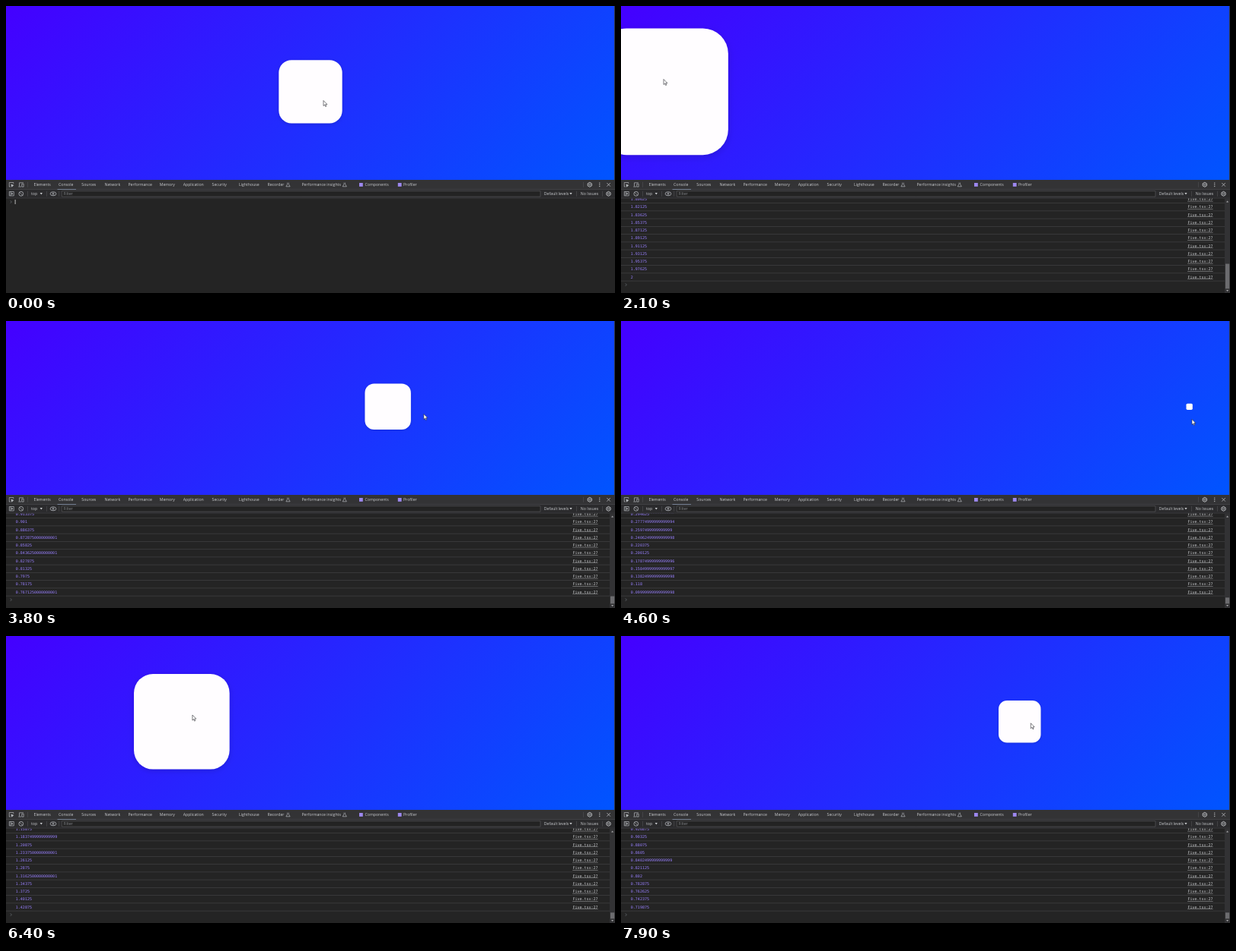
These frames come from a looping animation (800 px wide and 378 px high, 8000 ms). An HTML page with a canvas:

```html
<!DOCTYPE html>
<html lang="en">
<head>
<meta charset="utf-8">
<title>Drag to scale</title>
<style>
  html, body { margin: 0; width: 100%; height: 100%; overflow: hidden; background: #242424; }
  canvas { display: block; width: 800px; height: 378px; }
</style>
</head>
<body>
<canvas id="stage" width="800" height="378"></canvas>
<script>
const ctx = document.getElementById('stage').getContext('2d');
const LOOP = 8000, STEP = 100;
const UNIT = 800 / 1920;          // page pixels to stage pixels
const UI = '"Open Sans", "Noto Sans", sans-serif';
const MONO = '"DejaVu Sans Mono", monospace';

// ---------- motion ----------
// Each drag runs through a few [time, offset] points from press to release;
// gap is the time between its log entries.
const drags = [
  { gap: 44, path: [[434, 0], [1200, -560], [1622, -645], [2062, -800], [2100, -822], [2150, -819]] },
  { gap: 18, path: [[3356, 0], [3900, 312], [4382, 627], [4562, 800], [4602, 832]] },
  { gap: 18, path: [[5954, 0], [6600, -600], [6872, -721], [7052, -775], [7100, -770],
    [7500, -216], [7682, 65], [7862, 249], [7900, 297], [8000, 420]] }
];
drags.forEach((d, i) => {
  d.press = d.path[0][0];
  [d.release, d.end] = d.path[d.path.length - 1];
  d.until = i + 1 < drags.length ? drags[i + 1].path[0][0] : LOOP;
});

// time, x, y of the pointer's tip
const pointerPath = [
  [100, 417, 124.5], [200, 379.5, 117.5], [434, 379.5, 117.5], [1200, 147, 102],
  [2100, 56, 96.5], [3000, 316.7, 113], [3356, 400, 117], [4600, 750, 129.5],
  [5600, 513.7, 117], [5954, 402, 112], [7100, 81.7, 95.5], [7900, 538.3, 114.8], [8000, 580, 117]
];

// Monotone cubic through the points, for column c
function follow(path, t, c = 1) {
  const last = path.length - 1;
  if (t <= path[0][0]) return path[0][c];
  if (t >= path[last][0]) return path[last][c];
  let i = 0;
  while (path[i + 1][0] < t) i++;
  const slope = k => k < 0 || k >= last ? 0
    : (path[k + 1][c] - path[k][c]) / (path[k + 1][0] - path[k][0]);
  const tangent = k => {
    const a = slope(k - 1), b = slope(k);
    return a * b > 0 ? 2 * a * b / (a + b) : 0;
  };
  const h = path[i + 1][0] - path[i][0], p = (t - path[i][0]) / h, q = 1 - p;
  return q * q * (1 + 2 * p) * path[i][c] + p * p * (1 + 2 * q) * path[i + 1][c]
    + h * p * q * (q * tangent(i) - p * tangent(i + 1));
}

// Overdamped spring: stiffness 200, damping 40, mass 1
function spring(from, ms) {
  const d = Math.sqrt(200), slow = 20 - d, fast = 20 + d, s = ms / 1000;
  return from * (fast * Math.exp(-slow * s) - slow * Math.exp(-fast * s)) / (2 * d);
}

function dragX(t) {
  const d = drags.find(d => t >= d.press && t < d.until);
  if (!d) return 0;
  return t < d.release ? Math.round(follow(d.path, t)) : spring(d.end, t - d.release);
}

const mix = (a, b, p) => a + (b - a) * p;
function scaleOf(x) {
  const u = Math.max(-800, Math.min(800, x));
  return u < 0 ? mix(2, 1, (u + 800) / 800) : mix(1, 0.1, u / 800);
}

// ---------- console log ----------
const LOG_DELAY = 36, SPRING_GAP = 18;
const logs = [];
let lastText = '1';
for (const d of drags) {
  for (let t = d.press; t < d.until; t += t < d.release ? d.gap : SPRING_GAP) {
    const text = String(scaleOf(dragX(t)));
    if (text !== lastText) logs.push({ t, text });
    lastText = text;
  }
}

// ---------- drawing helpers ----------
const GREY = '#b4b7bb', LIGHT = '#c9cbce';

function rect(x, y, w, h, fill) {
  ctx.fillStyle = fill;
  ctx.fillRect(x, y, w, h);
}
function text(str, x, y, { color = LIGHT, size = 5.2, font = UI, align = 'left' } = {}) {
  ctx.font = `${size}px ${font}`;
  ctx.textAlign = align;
  ctx.fillStyle = color;
  ctx.fillText(str, x, y + size * 0.36);
}
function outline(color, width) {
  ctx.strokeStyle = color;
  ctx.lineWidth = width;
  ctx.stroke();
}
function trace(points) {
  ctx.beginPath();
  points.forEach(([x, y]) => ctx.lineTo(x, y));
}
function line(points, color = GREY, width = 0.7) {
  trace(points);
  outline(color, width);
}
function fillPoly(points, color = GREY) {
  trace(points);
  ctx.fillStyle = color;
  ctx.fill();
}
function oval(x, y, rx, ry = rx) {
  ctx.beginPath();
  ctx.ellipse(x, y, rx, ry, 0, 0, 2 * Math.PI);
  outline(GREY, 0.8);
}
function frame(x, y, w, h, color = GREY) {
  ctx.beginPath();
  ctx.rect(x, y, w, h);
  outline(color, 0.7);
}
const triangle = (x, y, w, h, color) =>
  fillPoly([[x - w, y - h], [x + w, y - h], [x, y + h]], color);
const divider = (x, y) => rect(x, y - 3.5, 0.6, 7, '#505054');

function gear(x, y) {
  const corner = i => {
    const a = Math.PI / 6 + i * Math.PI / 3;
    return [x + 3 * Math.cos(a), y + 3 * Math.sin(a)];
  };
  line([0, 1, 2, 3, 4, 5, 6].map(corner), LIGHT, 0.9);
  oval(x, y, 1.1);
}
function flask(x, y) {
  line([[x - 0.8, y - 2.6], [x - 0.8, y - 0.6], [x - 2.6, y + 2.5], [x + 2.6, y + 2.5],
    [x + 0.8, y - 0.6], [x + 0.8, y - 2.6]]);
}

// ---------- scene ----------
const PAGE_H = 229, CENTER_Y = 112.8;

function drawPage(x) {
  const half = (800 + PAGE_H) / 4;
  const g = ctx.createLinearGradient(400 - half, PAGE_H / 2 - half, 400 + half, PAGE_H / 2 + half);
  g.addColorStop(0, '#4400ff');
  g.addColorStop(1, '#0055ff');
  rect(0, 0, 800, PAGE_H, g);
  rect(799, 0, 1, PAGE_H, '#33343c');

  const s = scaleOf(x), size = 200 * UNIT * s;
  ctx.save();
  ctx.shadowColor = 'rgba(0,0,0,0.14)';
  ctx.shadowBlur = 5 * s;
  ctx.shadowOffsetY = 1.2 * s;
  ctx.beginPath();
  ctx.roundRect(400 + x * UNIT - size / 2, CENTER_Y - size / 2, size, size, size / 5);
  ctx.fillStyle = '#fffdff';
  ctx.fill();
  ctx.restore();
}

const tabs = {
  Elements: 36.5, Console: 69, Sources: 99.3, Network: 129.5, Performance: 160.5,
  Memory: 201.7, Application: 232.7, Security: 270.6, Lighthouse: 306, Recorder: 343.5,
  'Performance insights': 388.5, Components: 471.5, Profiler: 522
};

function drawTabs() {
  const y = 235.3;
  rect(0, PAGE_H, 800, 13, '#333335');
  rect(0, 241.2, 800, 0.7, '#4b4b4f');
  rect(67.5, 241, 24.5, 0.8, '#93a3bd');

  line([[9.8, 234], [9.8, 232.5], [4.3, 232.5], [4.3, 238], [6, 238]]);
  fillPoly([[6.5, 234.6], [10.4, 236], [7.3, 238.7]]);
  line([[17.5, 237.5], [17.5, 232.8], [23, 232.8]]);
  line([[16.3, 238], [20, 238]]);
  frame(20.8, 234.3, 2.4, 3.8);
  divider(28, y);

  for (const name in tabs) text(name, tabs[name], y);
  for (const x of [370.5, 444.8]) flask(x, y);
  for (const x of [464, 514.8]) rect(x, 233, 4.8, 4.8, '#9d88f0');

  divider(758, y);
  gear(766.8, y);
  for (const dy of [-2.2, 0, 2.2]) rect(779.2, y + dy - 0.5, 1.1, 1.1, LIGHT);
  for (const s of [-2.3, 2.3]) line([[791.6 - s, y - 2.3], [791.6 + s, y + 2.3]], LIGHT);
}

function drawToolbar() {
  const y = 247.3;
  rect(0, 241.9, 800, 11, '#2b2b2d');
  rect(0, 252.8, 800, 0.7, '#47474a');
  frame(4.3, 244.5, 6, 5.4);
  line([[6, 244.5], [6, 249.9]]);
  fillPoly([[7.2, 245.6], [9.4, 247.2], [7.2, 248.8]]);
  oval(19.8, y, 2.9);
  line([[17.8, 245.3], [21.8, 249.3]]);
  for (const x of [28, 53, 69.5, 749, 783]) divider(x, y);
  text('top', 33, y);
  triangle(46.3, y, 1.6, 1.3, LIGHT);
  oval(62, y, 3.9, 2.5);
  oval(62, y, 1);
  rect(73.3, 243.7, 628.7, 7.4, '#232323');
  frame(73.3, 243.7, 628.7, 7.4, '#56565a');
  text('Filter', 75.5, y, { color: '#85878b' });
  text('Default levels', 706.8, y);
  triangle(742, y, 1.6, 1.3, LIGHT);
  text('No Issues', 754.8, y);
  gear(791.5, y);
}

function drawScrollbar(contentH) {
  rect(793, 253.5, 7, 124.5, '#323234');
  triangle(796.6, 257.4, 1.6, -1, '#a5a5a8');
  triangle(796.6, 375, 1.6, 1, '#a5a5a8');
  const thumb = Math.max(8, 109 * 117 / contentH);
  rect(794, 372.3 - thumb, 5.2, thumb, '#6c6c6f');
}

function drawConsole(t) {
  const ROW = 10.25, TOP = 258, BOTTOM = 367.1;
  const count = logs.filter(l => l.t <= t - LOG_DELAY).length;
  const overflow = TOP + count * ROW > BOTTOM;
  const promptY = overflow ? BOTTOM : TOP + count * ROW;
  const mono = { size: 5.03, font: MONO };

  rect(0, 253.5, 800, 124.5, '#242424');
  ctx.save();
  ctx.beginPath();
  ctx.rect(0, 253.5, 800, 124.5);
  ctx.clip();
  for (let i = Math.max(0, count - 12); i < count; i++) {
    const y = promptY - (count - i) * ROW;
    rect(0, y + 4.9, 793, 0.7, '#414143');
    text(logs[i].text, 12.8, y, { ...mono, color: '#9980ff' });
    text('Five.tsx:27', 777.6, y, { ...mono, align: 'right' });
    rect(744.2, y + 2.5, 33.4, 0.5, '#b5b6b9');
  }
  line([[5.8, promptY - 1.7], [7.4, promptY], [5.8, promptY + 1.7]], '#70767c');
  if (t < 400) rect(11.7, promptY - 3, 0.8, 6, '#dcdcdc');
  if (overflow) drawScrollbar((count + 1) * ROW);
  ctx.restore();
}

function drawPointer(x, y) {
  const shape = [[0, 0], [0, 7], [1.6, 5.5], [2.7, 8], [3.8, 7.5], [2.7, 5.1], [4.9, 5], [0, 0]];
  const points = shape.map(([dx, dy]) => [x + dx, y + dy]);
  fillPoly(points, '#fff');
  line(points, '#25252c', 0.6);
}

function draw(t) {
  drawPage(dragX(t));
  drawTabs();
  drawToolbar();
  drawConsole(t);
  drawPointer(follow(pointerPath, t, 1), follow(pointerPath, t, 2));
}

// The picture advances ten times a second
const start = performance.now();
function tick() {
  const t = Math.max(0, performance.now() - start) % LOOP;
  draw(Math.floor(t / STEP) * STEP);
  requestAnimationFrame(tick);
}
tick();
</script>
</body>
</html>
```
